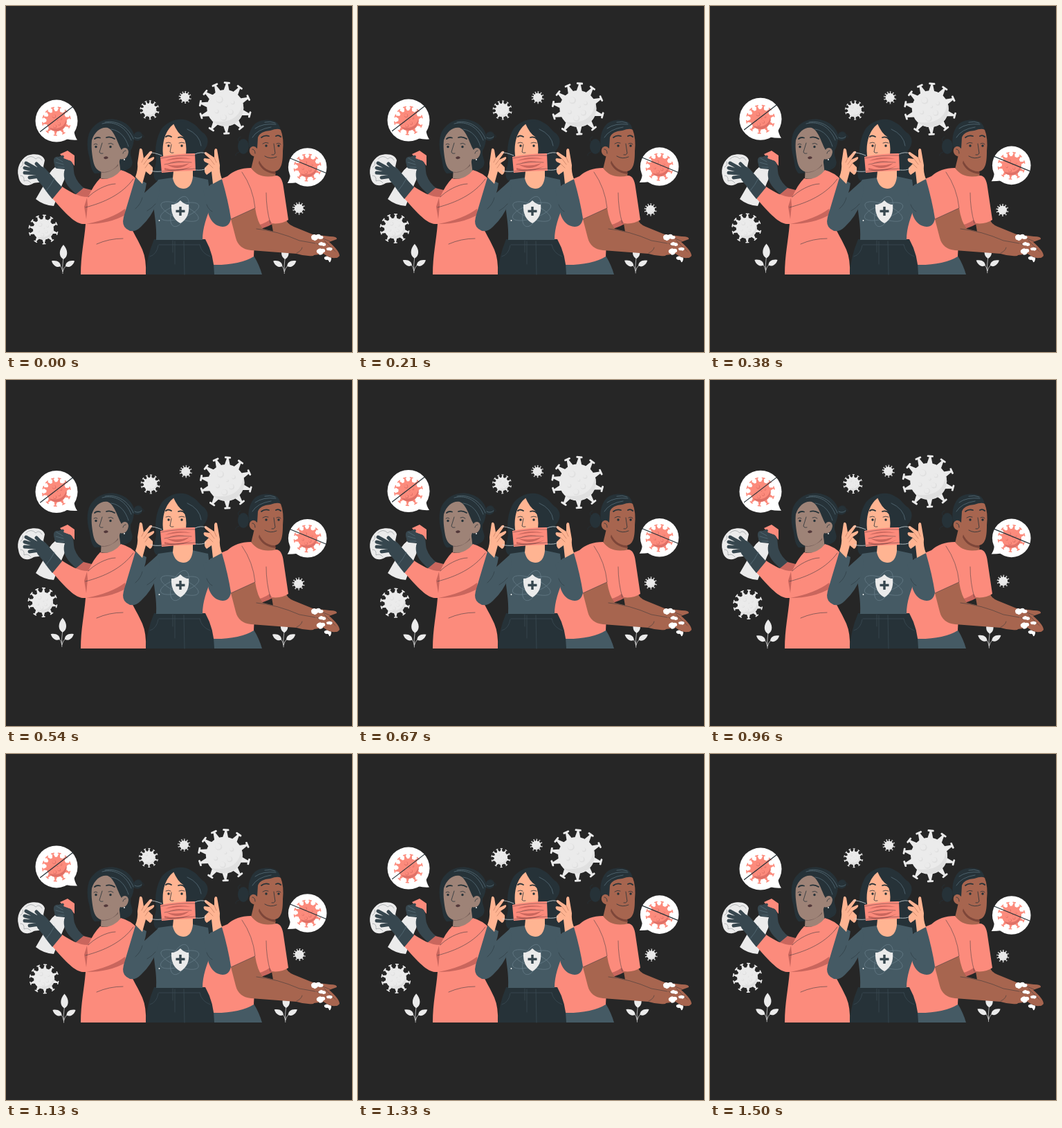
An HTML page that plays this animation: 500x500 px, repeating every 1540 ms.

```html
<!DOCTYPE html>
<html lang="en">
<head>
<meta charset="utf-8">
<style>
html, body { margin: 0; height: 100%; overflow: hidden; background: #262626; }
svg { display: block; width: 100vw; height: 100vh; }
.ink { fill: #263238; }
.blue { fill: #455a64; }
.glove { fill: #37474f; }
.coral { fill: #fc8b7c; }
.red { fill: #c9665d; }
.pale { fill: #ebebeb; }
.white { fill: #fff; }
.skin1 { fill: #9e8377; }
.skin2 { fill: #ffb492; }
.skin3 { fill: #a7654f; }
.line { fill: none; stroke: #263238; stroke-width: .8; stroke-linecap: round; stroke-linejoin: round; }
.soft { stroke: #566d78; }
.thick { stroke-width: 1.8; }
.fingers { fill: none; stroke: #37474f; stroke-width: 5; stroke-linecap: round; }
</style>
</head>
<body>
<svg viewBox="0 0 500 500">
  <g id="back"></g>

  <g id="cleaner">
    <path class="ink" d="M128 242C121 235 123 225 119 213C116 196 118 182 127 174C135 165 150 161 162 165C175 168 183 178 185 186C188 180 195 181 197 187C198 193 190 197 185 193C184 201 182 206 180 209C178 218 186 224 181 232C178 236 168 240 160 240Z"/>
    <path class="line" d="M186 184Q192 179 196 184M194 186Q200 185 199 190M179 231q-5 6-10 4"/>
    <path class="line soft" d="M139 170C158 165 174 176 181 194M143 168C162 164 178 177 184 192M152 178C165 180 173 190 177 203M186 190q5 3 10-1"/>
    <path class="skin1" d="M138 232L163 218L166 243Q153 252 137 249Z"/>
    <path fill="#77605a" d="M139 239Q154 237 162 226L162 231Q151 241 138 241Z"/>
    <path class="skin1" d="M124 194C128 181 138 174 147 176C157 180 161 198 167 208C169 203 177 204 177 211C176 219 171 223 165 221C162 232 154 239 142 240C133 240 128 234 126 224C124 212 123 204 124 194Z"/>
    <path class="line" d="M139 198L135 211Q136 214 140 213M169 213q1-4 4-4M148 199q4-2 7 1M127 200q3-2 5 0"/>
    <path class="line thick" d="M128 192Q131 189 136 190.500M145 190Q151 188 157 192"/>
    <circle class="ink" cx="130" cy="203.500" r="1.700"/><circle class="ink" cx="151" cy="203.500" r="1.700"/>
    <path fill="#52383a" d="M141 219Q144 216 147 218Q149 220 145 221Q142 222 141 219Z"/>
    <circle class="pale" cx="171" cy="222" r="1"/>

    <path class="pale" d="M73 231L88 237Q86 248 82 256L69 289Q54 288 43 279L54 260Q60 241 73 231Z"/>
    <path class="coral" d="M78 214L89 209L99 216V231L93 224L84 221Z"/>
    <path class="glove" d="M70 229C67 220 71 217 76 218L81 216C83 215 85 217 83 220L91 223C99 225 97 235 99 244Q103 256 114 264L104 275L92 263C84 254 82 244 85 236L75 235Q70 235 70 229Z"/>
    <path class="line soft" d="M73 220l9 5M72 226l11 3M75 233l9 0"/>
    <path class="red" d="M100 273L112 263L128 267L118 286Z"/>
    <path class="coral" d="M136 249C146 252 159 247 166 237Q181 241 190 252L200 290L172 300C179 320 189 334 197 352Q203 366 202 388H108C108 360 113 340 115 315C103 316 93 308 67 278L81 261C92 268 104 276 119 276Q126 259 136 249Z"/>
    <path class="red" d="M117 277L113 290L116 308L118 288ZM116 315Q152 308 172 293L174 301Q150 315 116 315Z"/>
    <path class="line" stroke-opacity=".65" d="M115 291C142 284 168 272 184 250M119 276C126 268 145 257 158 257M131 344Q149 336 169 336"/>

    <path class="pale" d="M18 246C15 235 20 222 31 216C43 212 54 215 56 223L54 232L60 247C54 257 46 254 40 256C31 262 20 260 18 246Z"/>
    <path class="line" stroke-opacity=".35" d="M29 221q7-7 14 0q5-5 9 2M21 245q6 0 5 8q6-3 10 3M21 233q5-3 3-8"/>
    <path class="fingers" d="M47 237L29 227M46 239L27 234M46 242L27 241M48 246L34 248M53 237L44 228"/>
    <path class="glove" d="M43 234Q50 229 57 235C65 244 71 251 81 262L67 279C59 270 54 261 46 252Q41 245 43 234Z"/>
    <path class="line soft" d="M58 267Q65 259 70 249"/>
  </g>

  <g id="washer">
    <path class="blue" d="M298 370L358 361Q366 374 370 388H298Z"/>
    <ellipse class="ink" cx="343" cy="203" rx="8" ry="11"/>
    <path class="line" d="M337 197q-4-6 2-8M337 211q-6 2-5 5"/>
    <path class="ink" d="M353 207C348 198 350 180 359 171C367 163 385 163 392 169Q398 175 396 184L372 186L367 216Z"/>
    <path class="line soft" d="M360 177Q371 169 390 171M356 190Q363 178 383 175M374 168q8-2 15 1"/>
    <path class="skin3" d="M360 211L386 228L390 247Q373 258 353 240Z"/>
    <path fill="#7d4639" d="M366 223Q374 236 389 238L390 243Q371 241 365 227Z"/>
    <path class="skin3" d="M364 190Q367 181 382 180Q393 176 397 179Q402 191 400 210C400 224 399 238 388 239C377 239 367 231 364 217C355 220 349 211 353 205Q358 200 363 206Z"/>
    <path class="line" d="M387 199L389 213Q387 216 384 215M374 217Q382 222 391 218M356 207q4 0 4 6M371 199q4-3 8-1M391 199q4-2 6 1"/>
    <path class="line thick" d="M369 190Q374 186 380 188M390 188Q394 186 397 189"/>
    <circle class="ink" cx="376" cy="202" r="1.700"/><circle class="ink" cx="394" cy="202" r="1.700"/>
    <path class="skin3" d="M383 309L405 306Q404 314 416 319L443 330L468 333Q479 333 478 337L467 341Q482 354 482 361Q478 367 470 361L440 344L386 326Z"/>
    <path class="coral" d="M354 234Q366 251 391 245Q399 246 401 262L408 309Q398 316 383 314L360 322L358 362Q337 375 297 374L282 337L296 256L320 246Q333 234 354 234Z"/>
    <path class="red" d="M359 317Q372 316 381 309L385 315Q373 322 360 323Z"/>
    <path class="skin3" d="M325 308L360 292Q363 312 371 322Q393 327 421 335L448 342Q455 346 450 355L444 361Q432 362 420 358L354 353Q336 351 332 335Z"/>
    <path class="line" stroke-opacity=".6" d="M341 240Q357 263 360 292L325 308M376 270Q376 293 382 314M362 322Q392 325 424 339L447 343M420 357Q427 354 428 349M446 331L468 340M449 343L474 361M460 339L478 357"/>
    <path class="skin3" d="M442 345L467 348L480 358Q482 364 476 364Q468 365 459 358L445 360Z"/>
    <g class="white">
      <path d="M441 333q3-5 7-2q5-3 7 1q5 0 3 4q-4 2-7 0q-4 5-7 2q-3 0-3-5Z"/>
      <path d="M451 344q4-5 7-2q5 0 4 4q-4 2-5 0q-4 1-6-2ZM449 353q4-4 7-2q6-1 5 4q-3 1-4 4q-5 2-5-1q-4-1-3-5ZM463 350q7-3 9 1q-2 4-5 2q-4 1-4-3Z"/>
      <path d="M460 363q4-3 7 0q4 0 3 3q-1 5-3 4q-1-4-4-3q-4-1-3-4Z"/>
    </g>
  </g>

  <g id="masked">
    <path class="ink" d="M218 253C208 245 218 232 217 220C214 202 220 184 226 176C237 164 255 160 267 168C278 173 278 179 286 184C295 192 292 203 285 210C287 221 298 232 309 246C313 255 302 260 290 258Z"/>
    <path class="ink" d="M214 337H288Q301 360 301 388H202Q203 363 214 337Z"/>
    <path class="line" style="stroke:#3a4b54" d="M220 346q-2 13-12 16M280 345q2 12 15 17M241 339v17M244 340v33M257 340l1 48M221 345h59"/>
    <path class="blue" d="M241 248L269 246L292 251L297 287C290 305 284 320 284 338H217C218 316 214 302 213 286Q213 263 220 251Z"/>
    <path class="skin2" d="M242 239L270 236V247Q268 264 256 264Q244 263 241 249Z"/>
    <path class="skin2" d="M228 222C224 203 228 181 243 170Q260 181 262 205L262 229Q253 241 239 235Z"/>
    <path class="ink" d="M242 170Q248 184 256 189Q262 198 260 215L275 218V183L258 166Z"/>
    <path class="line" d="M239 200L237 211Q239 213 242 212M231 198q4-2 7 0M250 198q4-2 8 0"/>
    <path class="line thick" d="M231 189Q234 186 239 189M249 190Q255 188 259 193"/>
    <circle class="ink" cx="235" cy="202" r="1.700"/><circle class="ink" cx="254" cy="202" r="1.700"/>
    <path class="line soft" d="M262 178Q280 186 282 202"/>

    <path class="blue" d="M187 248L203 256Q202 264 200 270L220 252Q224 270 217 286Q211 304 195 319Q184 330 174 322Q167 317 170 305Z"/>
    <path class="blue" d="M296 258L312 250Q321 281 325 307Q323 319 313 319Q299 318 293 302L285 266Z"/>
    <path class="line" stroke-opacity=".6" d="M216 286Q210 293 204 296M187 293Q195 286 197 277M290 287q3 8 8 10"/>
    <g fill="none" stroke="#6b828d" stroke-width=".6">
      <ellipse cx="251" cy="297" rx="29" ry="10" transform="rotate(-18 251 297)"/>
      <ellipse cx="251" cy="297" rx="29" ry="10" transform="rotate(22 251 297)"/>
      <ellipse cx="251" cy="297" rx="11" ry="23" transform="rotate(22 251 297)"/>
    </g>
    <circle class="white" cx="221.500" cy="310" r=".9"/>
    <path class="pale" d="M252 281Q258 287 264 287Q266 306 252 314Q238 307 239 287Q246 287 252 281Z"/>
    <path d="M252 290v13M245.500 296.500h13" stroke="#37474f" stroke-width="3.400"/>

    <path class="skin2" d="M187 247Q191 236 190 227L193 207Q195 204 197 208L199 220L208 210Q212 209 211 212L204 222L213 218Q216 219 212 223L206 227L212 233Q213 242 208 244L202 239L197 257Z"/>
    <path class="skin2" d="M312 250Q308 240 309 230L305 207Q302 204 301 209L301 219L289 211Q285 211 288 215L295 221L287 220Q284 221 287 225L293 228L287 234Q286 241 290 244L297 239L299 257Z"/>
    <path class="line" style="stroke:#c98468" d="M199 220l-3 6M204 222l-5 7M206 227l-5 7M301 219l3 7M295 221l6 8M293 228l6 6"/>
    <path class="line" style="stroke:#cfd8dc" d="M225 216Q213 211 207 212M225 239Q214 240 209 238M273 214Q282 210 289 213M274 237Q284 238 289 235"/>
    <path class="coral" d="M223 218Q248 213 273 213L274 238Q249 238 225 241Z"/>
    <path class="red" d="M230 224Q247 216 268 221Q250 219 230 224ZM229 234Q248 240 270 231Q251 242 229 237ZM234 228Q247 221 262 226Q250 223 234 228ZM232 229Q249 233 265 227Q250 240 232 229Z"/>
    <path class="line" stroke-opacity=".5" d="M224 220Q248 215 273 216M225 239Q249 236 274 235M229 229Q249 224 268 226"/>
  </g>

  <g id="front"></g>
</svg>
<script>
const LOOP = 1540;
const SPIKES = [-86, -55, -24, 15, 51, 87, 123, 162, 191, 218, 246];
const CRATERS = [[-8, -12, 5], [11, -8, 3], [8, 6, 4], [-12, 5, 3], [-2, 14, 4.500], [2, -3, 2]];
const floaters = [];

function add(layer, markup, dx, dy, wave) {
  const node = document.createElementNS('http://www.w3.org/2000/svg', 'g');
  node.innerHTML = markup;
  document.getElementById(layer).append(node);
  floaters.push({ node, dx, dy, wave });
}

// Drawn with a body radius of 26.5 and spikes reaching 38, then scaled.
function virus(x, y, reach, body = '#ebebeb', shade = '#e0e0e0', turn = 0) {
  const spikes = SPIKES.map(a =>
    `<path transform="rotate(${a})" d="M24-4.500L35-1.500L35.500-4.500Q37-5 38-4V4Q37 5 35.500 4.500L35 1.500L24 4.500Z"/>`).join('');
  const craters = CRATERS.map(([cx, cy, r]) =>
    `<circle cx="${cx}" cy="${cy}" r="${r}" fill="${shade}"/><circle cx="${cx - .8}" cy="${cy - .8}" r="${r * .8}"/>`).join('');
  return `<g transform="translate(${x} ${y}) rotate(${turn}) scale(${reach / 38})" fill="${body}">
    ${spikes}<circle r="26.500"/><path fill="${shade}" d="M25-9A26.500 26.500 0 0 1-18 19Q21 24 25-9Z"/>${craters}</g>`;
}

function bubble(x, y, r, tail, reach, strike) {
  return `<g transform="translate(${x} ${y})"><circle class="white" r="${r}"/><path class="white" d="${tail}"/>
    ${virus(0, .5, reach, '#fc8b7c', '#df7167', 8)}<path class="line" style="stroke-width:1.200" d="${strike}"/></g>`;
}

function plant(x, y) {
  const leaf = (lx, ly, angle, size) =>
    `<path transform="translate(${lx} ${ly}) rotate(${angle}) scale(${size})" d="M0 0C-7-4-7-13 0-21C7-13 7-4 0 0Z"/>`;
  return `<g transform="translate(${x} ${y})" class="pale">
    ${leaf(0, -21, 0, 1)}${leaf(-4, -11, -60, .72)}${leaf(3, -11, 60, .72)}
    <path d="M0-24Q-2-10-1 0M-5-12Q-2-9-1-3M4-12Q0-8-1-3" fill="none" stroke="#ebebeb" stroke-width=".7"/></g>`;
}

add('back', plant(83, 387), -1.500, -1.500, Math.sin);
add('back', plant(403.300, 387), -1.500, -.9, Math.sin);
add('front', virus(316.800, 147.500, 38), 1.500, 1.300, Math.sin);
add('front', virus(207.500, 150.300, 14), 1.500, .3, Math.sin);
add('front', virus(258.700, 132, 9), 1.400, .4, Math.sin);
add('front', virus(54, 323, 21.500), -1.200, -2, Math.sin);
add('front', virus(423.200, 292.500, 9), -.7, 2.500, Math.sin);
add('front', bubble(73, 163.200, 30.500, 'M13 26Q22 28 30 27.500Q26 22 25 13Z', 21, 'M-23.500 15.500L23.500-20.500'), 0, 2.900, Math.cos);
add('front', bubble(435.700, 230.300, 27.800, 'M-25 11Q-25 17-29 23Q-21 23-14 22Z', 20, 'M-25-13L26 8'), 0, 2.700, Math.cos);

function draw(now) {
  const angle = (now % LOOP) / LOOP * 2 * Math.PI;
  for (const { node, dx, dy, wave } of floaters) {
    const w = wave(angle);
    node.setAttribute('transform', `translate(${dx * w} ${dy * w})`);
  }
  requestAnimationFrame(draw);
}
draw(performance.now());
</script>
</body>
</html>
```
